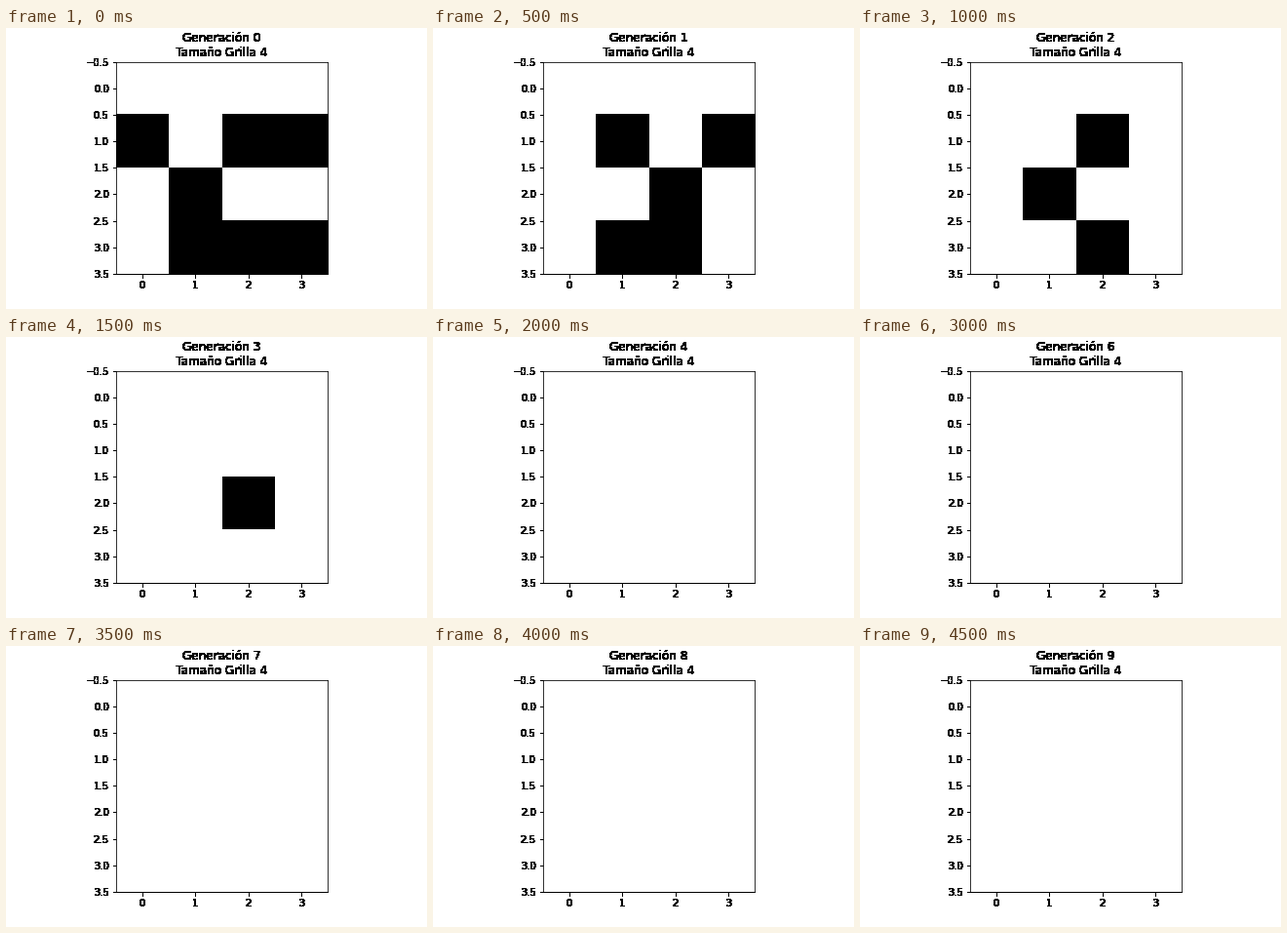
Animation of 432x288 px, one loop 5 s. Source, as a matplotlib script:

```python
import matplotlib.pyplot as plt
import numpy as np
from matplotlib.animation import FuncAnimation

GENERATIONS = 10
SIZE = 4

# Live cells of each generation, one string per row; later ones are empty.
STATES = [
    ("0000", "1011", "0100", "0111"),
    ("0000", "0101", "0010", "0110"),
    ("0000", "0010", "0100", "0010"),
    ("0000", "0000", "0010", "0000"),
]


def grid(gen):
    if gen >= len(STATES):
        return np.zeros((SIZE, SIZE))
    return np.array([[int(c) for c in row] for row in STATES[gen]])


def harden(img, dpi):
    """Make every touched pixel opaque, for crisp, heavy lettering."""
    out = img.copy()
    out[..., 3] = out[..., 3] > 0
    return out, 0, 0


plt.rcParams["font.family"] = "DejaVu Sans"
plt.rcParams["font.size"] = 10

fig = plt.figure(figsize=(6, 4), dpi=72, facecolor="white")
fig.subplots_adjust(left=0.125, right=0.9, bottom=0.125, top=0.88)
ax = fig.add_subplot()
ax.set_agg_filter(harden)
cells = ax.imshow(grid(0), cmap="binary", vmin=0, vmax=1)
ax.set_xticks(range(SIZE))
ax.set_yticks(np.arange(-0.5, SIZE, 0.5))
title = ax.set_title("", fontsize=12)


def update(gen):
    cells.set_data(grid(gen))
    title.set_text(f"Generación {gen}\nTamaño Grilla {SIZE}")
    return cells, title


anim = FuncAnimation(fig, update, frames=GENERATIONS, interval=500,
                     repeat=True, repeat_delay=0, blit=False)
plt.show()
```
